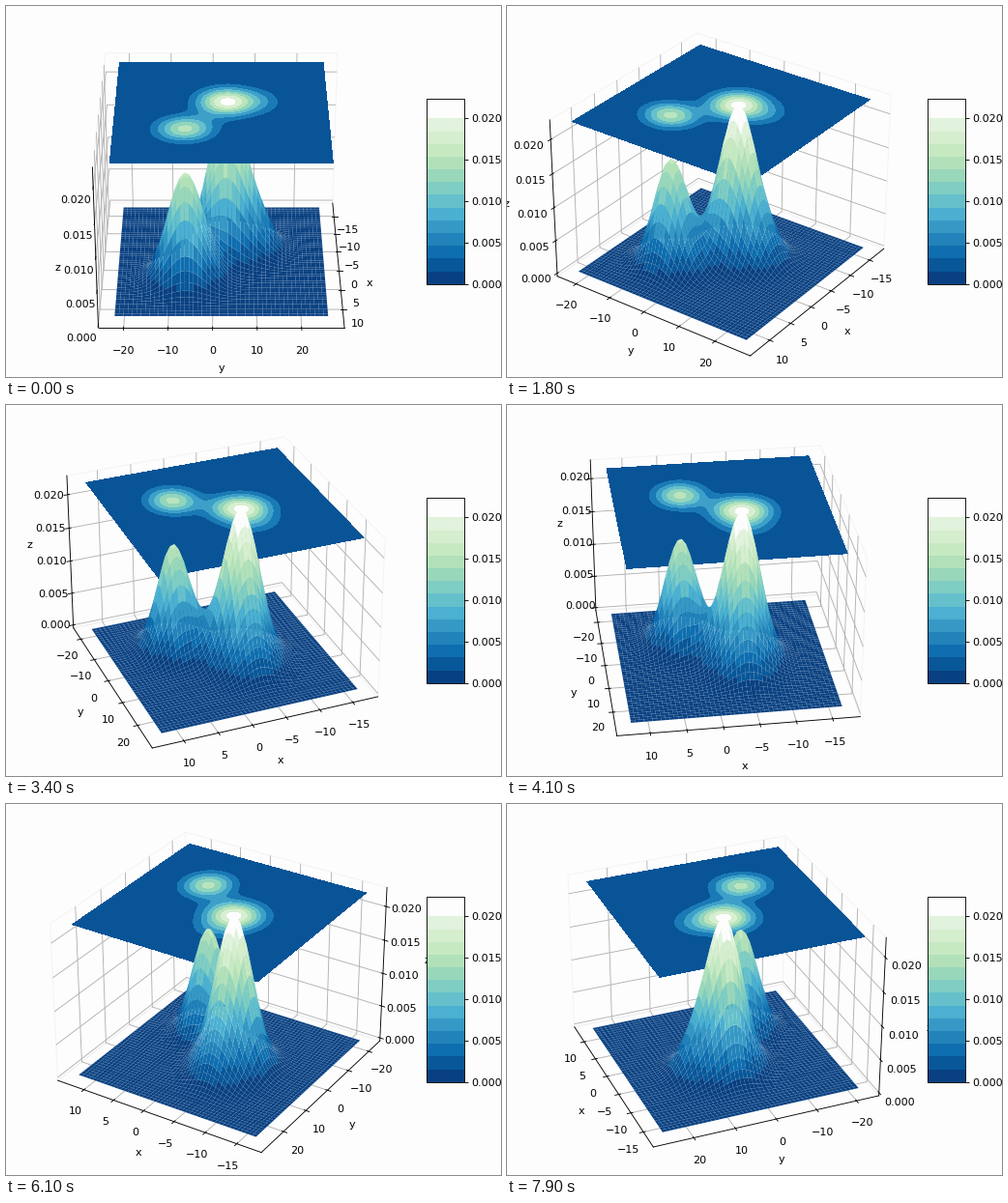
Animation of 512 by 384 pixels, one loop 8000 ms. Source, as a matplotlib script:

```python
import matplotlib.pyplot as plt
import numpy as np
from matplotlib.animation import FuncAnimation
from matplotlib.colors import ListedColormap, to_rgba

FRAMES = 80
INTERVAL = 100
STEP = 2            # degrees of azimuth per frame
ELEV = 30
PLANE_IN_FRONT = 6  # below this azimuth the contour plane covers the peaks

WHITE = "#fdfdfd"
PEAK = 0.02233
X_RANGE = (-16.71, 12.39)
Y_RANGE = (-22.15, 26.1)

# amplitude, centre x, centre y, sigma x, sigma y
BUMPS = [
    (0.0222, -4.74, 3.35, 2.63, 4.4),
    (0.0159, 3.1, -6.2, 2.3, 4.2),
    (0.0036, -4.8, 11.5, 2.4, 3.2),
    (0.0010, -0.8, -1.4, 2.0, 3.0),
]


def density(x, y):
    z = sum(a * np.exp(-((x - cx) / sx) ** 2 / 2 - ((y - cy) / sy) ** 2 / 2)
            for a, cx, cy, sx, sy in BUMPS)
    return z * PEAK / z.max()


def stepped_cmap(bands=13, top=0.896):
    """Blue-green ramp in flat bands, with a white cap above `top`."""
    t = np.arange(256) / 255
    band = np.minimum(np.floor(t / top * bands), bands - 1)
    colors = plt.cm.GnBu_r(band / (bands - 1) * 0.875)
    colors[t >= top] = to_rgba(WHITE)
    return ListedColormap(colors)


def padded(lo, hi, margin):
    """Widen limits by a data margin plus the 1/48 gap to the panes."""
    pad = (hi - lo) * margin
    lo, hi = lo - pad, hi + pad
    gap = (hi - lo) / 48
    return lo - gap, hi + gap


x, y = np.meshgrid(np.linspace(*X_RANGE, 99), np.linspace(*Y_RANGE, 99))
z = density(x, y)

fig = plt.figure(figsize=(6.4, 4.8), dpi=80, facecolor=WHITE)
ax = fig.add_axes([0, 0, 1, 1], projection="3d", computed_zorder=False)
ax.set_facecolor(WHITE)

coarse = (slice(None, None, 2),) * 2
surf = ax.plot_surface(x[coarse], y[coarse], z[coarse], rstride=1, cstride=1,
                       cmap=stepped_cmap(), vmin=0, vmax=PEAK, zorder=2)

plane_colors = [plt.cm.GnBu_r((k + 0.5) / 8) for k in range(7)] + [WHITE]
plane = ax.contourf(x, y, z, levels=np.arange(9) * 0.003,
                    colors=plane_colors, zdir="z", offset=PEAK)

ticks = np.arange(5) * 0.005
fig.colorbar(surf, ax=ax, shrink=0.5, aspect=5, ticks=ticks)

ax.set(xlabel="x", ylabel="y", zlabel="z")
ax.set_xticks(range(-15, 11, 5))
ax.set_yticks(range(-20, 21, 10))
ax.set_zticks(ticks)
ax.set_xlim(*padded(*X_RANGE, 0.05))
ax.set_ylim(*padded(*Y_RANGE, 0.05))
ax.set_zlim(*padded(0, PEAK, 0))

for axis in (ax.xaxis, ax.yaxis, ax.zaxis):
    axis.pane.set_fill(False)
    axis.pane.set_edgecolor("#ececec")


def update(i):
    azim = STEP * i
    ax.view_init(ELEV, azim)
    plane.set_zorder(3 if azim < PLANE_IN_FRONT else 1)
    return []


anim = FuncAnimation(fig, update, frames=FRAMES, interval=INTERVAL,
                     init_func=lambda: [], repeat=True, repeat_delay=0)
plt.show()
```
